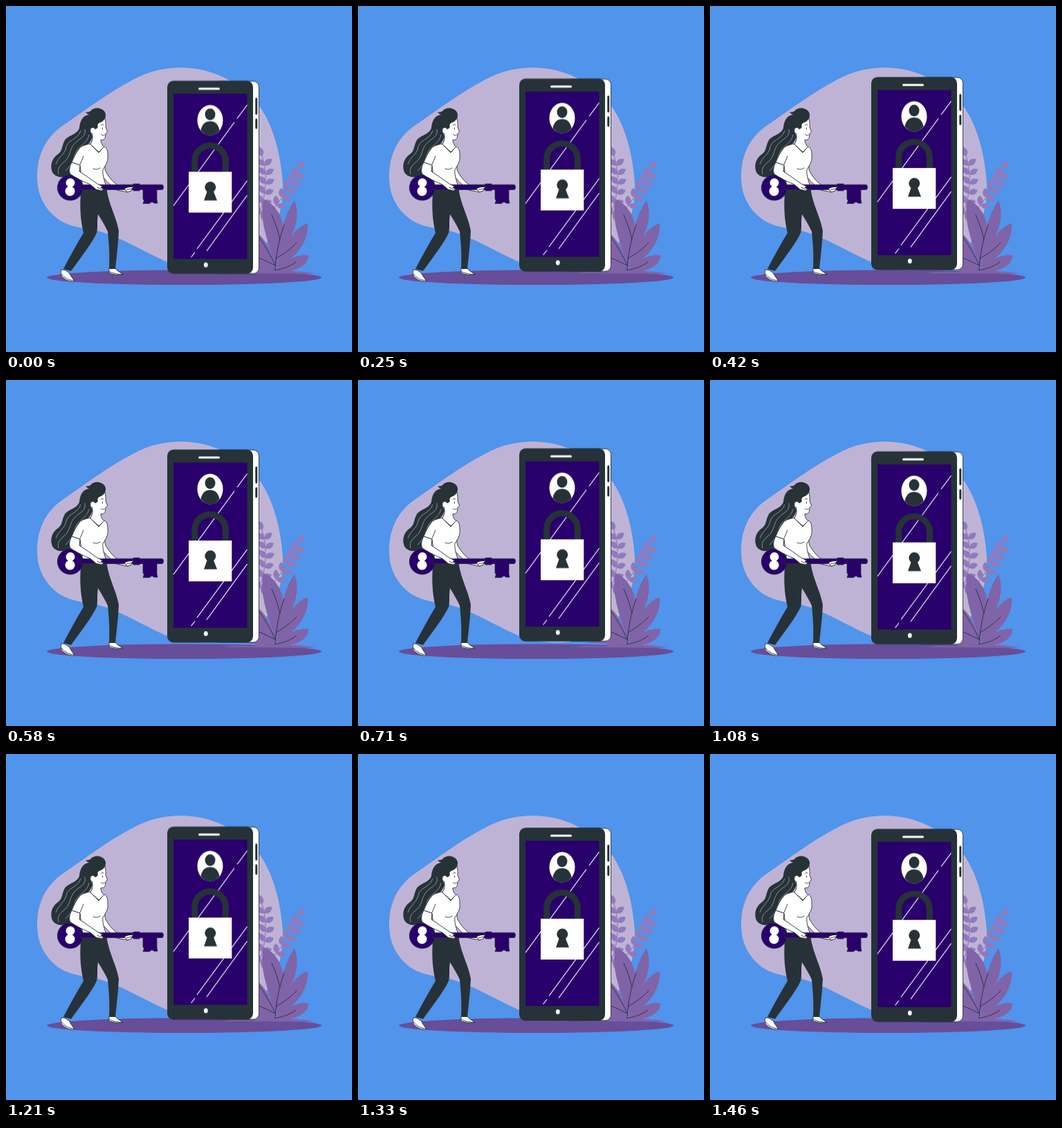
Write an HTML page that moves like this. It is 500 px wide and 500 px high and loops after 1.5 s.

```html
<!DOCTYPE html>
<html lang="en">
<head>
<meta charset="utf-8">
<title>Phone unlock</title>
<style>
html, body { margin: 0; width: 100%; height: 100%; overflow: hidden; background: #5094eb; }
svg { display: block; width: 100vw; height: 100vh; }
.phone { animation: float 1.5s linear -20ms infinite; }
@keyframes float { 50% { transform: translateY(-10px); } }
.dark { fill: #263238; }
.ink { fill: #29006b; }
.white { fill: #fff; }
.skin { fill: #fff; stroke: #263238; stroke-width: .9; stroke-linejoin: round; }
.line { fill: none; stroke: #263238; stroke-width: .9; stroke-linecap: round; stroke-linejoin: round; }
.shine { fill: none; stroke: #fff; stroke-width: 1.2; }
.strand { fill: none; stroke: #c9ced2; stroke-width: .6; }
</style>
</head>
<body>
<svg viewBox="0 0 500 500">
  <defs>
    <path id="leaf" d="M0 0C-6-4-5-10 0-14C5-10 6-4 0 0Z"/>
  </defs>

  <path fill="#bfb3d5" d="M45 247C45 216 57 190 82 173C115 150 150 124 181 108C205 94 230 89 255 89C297 90 333 108 360 137C386 166 398 218 400 258C400 301 387 339 358 361C322 384 269 384 231 369C193 352 168 335 133 325C105 320 85 318 68 302C52 287 45 268 45 247Z"/>
  <ellipse cx="257.500" cy="392.300" rx="198.500" ry="10.800" fill="#684d99"/>

  <!-- plant -->
  <g id="sprigs" fill="#917abb">
    <path fill="none" stroke="#917abb" stroke-width="1.200" d="M366 300Q382 255 370 217M372 310Q408 270 423 236"/>
  </g>
  <g fill="#8163a8">
    <path d="M389 376C381 345 365 312 372 279C389 286 401 305 401 326C401 345 394 363 389 376Z"/>
    <path d="M389 378C395 350 398 305 417 281C426 305 416 330 404 346C397 357 392 368 389 378Z"/>
    <path d="M389 380C398 350 415 321 436 314C438 340 420 364 389 380Z"/>
    <path d="M389 384C400 368 420 358 437 360C438 376 415 386 389 384Z"/>
    <path d="M389 380C386 357 376 338 360 325V384H389Z"/>
    <path d="M313 386C340 382 355 387 366 383C352 379 336 381 331 379C346 376 353 371 366 372L389 382C410 383 435 383 446 387Z"/>
  </g>
  <path class="line" d="M389 382C390 359 394 340 402 316M384 302C390 315 394 328 395.500 337M390 365C402 358 412 351 420 342M389.500 375C382 360 374 345 363 331M389 375C381 371 373 367 363 363M389 381.500C401 380 411 376 419 370"/>

  <!-- phone -->
  <g class="phone">
    <rect x="300" y="109.200" width="65.500" height="277.800" rx="8" class="skin"/>
    <rect x="233" y="108.500" width="124" height="279" rx="9" class="dark"/>
    <rect x="242" y="127.300" width="106.500" height="238.700" class="ink"/>
    <path fill="none" stroke="#fff" stroke-width="3" stroke-linecap="round" d="M279.500 120H307.500"/>
    <ellipse cx="288.800" cy="374.500" rx="2.900" ry="3.500" class="white"/>
    <path fill="none" stroke="#263238" stroke-width="3" stroke-linecap="round" d="M361.800 134.500V156M361.800 164.500V176.500"/>
    <path class="shine" d="M348.500 143.500L334 163M330 168.500L242 289M348.500 253L276 351.500M348.500 274L290 354.500M273 356.500L267.500 363.500"/>
    <ellipse cx="295" cy="165.500" rx="18.500" ry="22" class="white"/>
    <ellipse cx="295" cy="157" rx="7.500" ry="8.500" class="dark"/>
    <path class="dark" d="M281.500 180C283 171.500 288 167 295 167S307 171.500 308.500 180C305 185 300 187.500 295 187.500S285 185 281.500 180Z"/>
    <path fill="none" stroke="#263238" stroke-width="9" d="M272.700 242V224.500A22.300 22.300 0 0 1 317.300 224.500V242"/>
    <rect x="264" y="240" width="62.300" height="59" class="white"/>
    <circle cx="295.300" cy="262.300" r="8" class="dark"/>
    <path class="dark" d="M291.500 266H299L305 281.500H286Z"/>
  </g>

  <!-- woman -->
  <path class="skin" d="M123 180C126 187 126 193 122 200L134 211L142 204C138 200 137 197 137 193.500C141 194 143.500 192 143.500 188L144 185L146.500 181.500L144 175C144.500 171 144 168 143 162L128 164Z"/>
  <path class="dark" d="M115 153C118 154 120 153 122 152C126 146 137 146 142 152C146 157 144 165 137 168C134 169 132 171 132.500 173C133.500 176 131 178 128 178C126 174 121 176 122 181C123 184 124 186 125 189C122 200 108 207 103 219C100 225 101 233 97 239C93 246 89 247 82 247C73 248 67 243 66 237C64 229 67 220 74 215C82 209 80 204 84 196C88 186 103 187 106 176C107 166 111 158 120 157C118 156 116 155 115 153Z"/>
  <path class="strand" d="M114 178C116 190 106 191 99 199C91 207 94 219 82 227C76 232 74 237 76 243M120 186C118 199 105 202 101 211C97 221 95 230 86 238M108 180C103 194 90 192 87 204C85 215 76 217 72 229"/>
  <ellipse cx="125.500" cy="180" rx="3" ry="3.800" class="white"/>
  <path class="line" d="M137.500 185.500C139 187.500 141 187.500 142.500 186M137.500 172.500C138.500 171 140 171 141 172M139.500 176V178"/>

  <path class="skin" d="M80 381C86 381 88 384 91 385C93 390 97 394 99 398C92 399 87 396 83 393C79 390 79 386 80 381ZM149 379H158C160 383 166 385 169 388C163 390 156 388 149 386Z"/>
  <path class="line" d="M80 387C85 394 91 396 98 397M149 384C157 387 163 388 168 387.500"/>
  <path class="dark" d="M109 261L145 260C146 267 146.500 272 148 277C152 293 160 308 163 325C162 345 160 361 158 380H149C150 361 149 346 147 326C143 317 138 309 133 301C131 311 133 320 131 328C124 343 109 362 94 383L83 380C93 361 102 344 112 328C107 308 106 284 109 261Z"/>

  <path class="skin" d="M138 229L145 220C143 229 142 235 144 239C149 248 155 255 163 260L178 261L184 264L176 269L160 266C150 258 139 248 135 239Z"/>
  <path class="skin" d="M121 199C114 201 109 202 106 206C101 212 98 219 95 226L107 230L111 262H145C143 253 139 246 140 236C145 229 148 223 147 216C147 209 146 205 142 203L134 212Z"/>
  <path class="line" d="M107 229L112 217M126 235C130 237 133 236 136 234"/>

  <!-- key -->
  <g class="ink" stroke="#263238" stroke-width=".8">
    <circle cx="92.800" cy="262.500" r="18.500"/>
    <path d="M108 258.200H184V257H193V258.200H226C228 260 228 264 226 265.500H218V280L219 285H214L211 283L207 285.500H198L199.500 281L198 279V265.500H193V267H184V265.500H108Z"/>
  </g>
  <g class="white">
    <circle cx="93" cy="255.500" r="6.500"/>
    <circle cx="92.500" cy="267.500" r="7"/>
  </g>

  <path class="skin" d="M95 226C91 234 91 239 93 243C102 249 112 254 122 258L130 265L138 267L141 265L137 262L140 261L132 257C122 250 114 244 106 239L107 230Z"/>
  <path class="skin" d="M171 264L176 262L184 261L182 264L181 267L175 269Z"/>
  <path class="line" d="M132 262L138 265M174 266L181 264"/>
</svg>
<script>
const sprigs = document.getElementById('sprigs');

// Pairs of leaves along a quadratic curve, ending in a tip leaf.
function grow(a, b, c, pairs) {
  const at = (t, i) => (1 - t) ** 2 * a[i] + 2 * t * (1 - t) * b[i] + t * t * c[i];
  const add = (x, y, angle) => {
    const leaf = document.createElementNS('http://www.w3.org/2000/svg', 'use');
    leaf.setAttribute('href', '#leaf');
    leaf.setAttribute('transform', `translate(${x} ${y}) rotate(${angle})`);
    sprigs.append(leaf);
  };
  for (let i = 0; i <= pairs; i++) {
    const t = i / pairs, x = at(t, 0), y = at(t, 1);
    const dx = at(t + .01, 0) - at(t - .01, 0), dy = at(t + .01, 1) - at(t - .01, 1);
    const dir = Math.atan2(dx, -dy) * 180 / Math.PI;
    if (i === pairs) add(x, y, dir);
    else [-42, 62].forEach(turn => add(x, y, dir + turn));
  }
}
grow([366, 300], [382, 255], [370, 217], 6);
grow([372, 310], [408, 270], [423, 236], 7);
</script>
</body>
</html>
```
